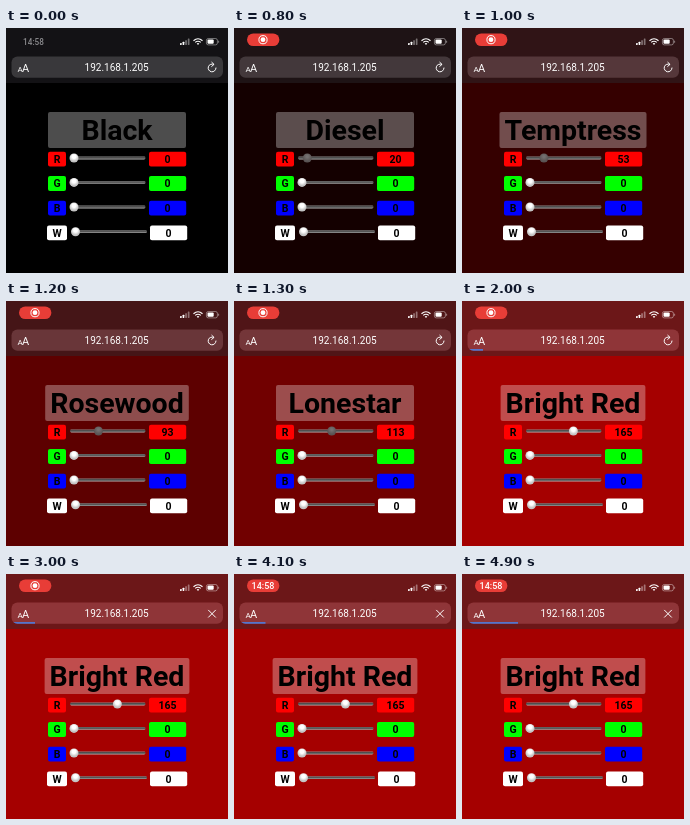
An HTML page for the animation above (5000 ms loop, 222 px wide and 245 px high).

```html
<!DOCTYPE html>
<html lang="en">
<head>
<meta charset="utf-8">
<title>RGBW slider</title>
<style>
html, body { margin: 0; width: 100%; height: 100%; overflow: hidden; background: #000; }
svg { display: block; width: 100vw; height: 100vh; font-family: Roboto, sans-serif; }
text { text-anchor: middle; }
.name { font-size: 28.5px; font-weight: 700; }
.tag { font-size: 10.5px; font-weight: 700; }
.bar { font-size: 10px; fill: #fff; }
.clock { font-weight: 500; }
</style>
</head>
<body>
<svg viewBox="0 0 222 245">
  <defs>
    <linearGradient id="groove" x2="0" y2="1">
      <stop offset="0" stop-color="#8c8c8c"/>
      <stop offset=".3" stop-color="#4c4c4c"/>
      <stop offset=".65" stop-color="#606060"/>
      <stop offset="1" stop-color="#b8b8b8"/>
    </linearGradient>
    <radialGradient id="knob" cy=".35">
      <stop offset=".4" stop-color="#fff"/>
      <stop offset="1" stop-color="#c4c4c4"/>
    </radialGradient>
    <radialGradient id="held" cy=".35">
      <stop offset=".2" stop-color="#747070"/>
      <stop offset="1" stop-color="#5a5454"/>
    </radialGradient>
    <clipPath id="clip"><rect x="5.5" y="28.5" width="211.5" height="21.3" rx="6"/></clipPath>
  </defs>

  <rect id="page" width="222" height="245"/>
  <rect id="head" width="222" height="55"/>
  <rect id="field" x="5.5" y="28.5" width="211.5" height="21.3" rx="6"/>
  <rect id="load" x="5.5" y="48.2" height="1.6" fill="#4486f4" clip-path="url(#clip)"/>
  <text class="bar" x="14" y="43.5" style="font-size:8px">A</text>
  <text class="bar" x="19.6" y="43.5" style="font-size:11px">A</text>
  <text class="bar" x="110.6" y="43">192.168.1.205</text>

  <g fill="none" stroke="#fff" stroke-linecap="round">
    <path id="reload" d="M207.8 36.4A3.9 3.9 0 1 0 210 40M205.8 34.3L208 36.4L205.7 38.4"/>
    <path id="stop" d="M202.5 36.2l7 7M209.5 36.2l-7 7"/>
  </g>

  <g fill="#fff">
    <rect x="174" y="15" width="1.7" height="2" rx=".4"/>
    <rect x="176.6" y="13.8" width="1.7" height="3.2" rx=".4"/>
    <rect x="179.2" y="12.2" width="1.7" height="4.8" rx=".4" fill-opacity=".4"/>
    <rect x="181.8" y="10.6" width="1.7" height="6.4" rx=".4" fill-opacity=".4"/>
    <path d="M190.7 15.5Q192 14.4 193.3 15.5L192 17Z"/>
    <path d="M187.5 12.7Q192 8.8 196.5 12.7M189.2 14.4Q192 12.1 194.8 14.4" fill="none" stroke="#fff" stroke-width="1.2"/>
    <rect x="200.4" y="10.5" width="11" height="6.4" rx="1.9" fill="none" stroke="#fff" stroke-opacity=".5" stroke-width=".8"/>
    <rect x="201.5" y="11.6" width="6.2" height="4.2" rx="1"/>
    <rect x="212.2" y="12.6" width=".9" height="2.2" rx=".4" fill-opacity=".5"/>
  </g>

  <rect id="pill" x="13" y="5.4" width="32.4" height="12.6" rx="6.3" fill="#e83d37"/>
  <g id="rec">
    <circle cx="29" cy="11.7" r="4.1" fill="none" stroke="#fff"/>
    <circle cx="29" cy="11.7" r="2.4" fill="#fff"/>
  </g>
  <text id="clock" class="clock">14:58</text>

  <rect id="plate" y="84" height="36" rx="2" fill="#fff" fill-opacity=".3"/>
  <text id="name" class="name" x="111" y="111.6"></text>
  <g id="rows"></g>
</svg>
<script>
const LOOP = 5000, STEP = 100;
const $ = id => document.getElementById(id);

// [time, red]
const RED = [[600, 0], [700, 6], [800, 20], [1000, 53], [1300, 113], [1500, 144], [1700, 162], [1800, 165]];
// [time, width of the loading line]
const LOAD = [[1800, 0], [1900, 9], [2000, 15.5], [3000, 23.5], [4100, 26], [4900, 50.5]];
// [lowest red, colour name]
const NAMES = [[0, "Black"], [10, "Diesel"], [32, "Sepia Black"], [49, "Temptress"], [63, "Burnt Maroon"],
  [70, "Mahogany"], [90, "Rosewood"], [105, "Lonestar"], [119, "Maroon"], [136, "Red Berry"], [160, "Bright Red"]];
// label, fill, centre y, x shift
const ROWS = [["R", "#f00", 131, 0], ["G", "#0f0", 155.4, 0], ["B", "#00f", 180, 0], ["W", "#fff", 204.7, 1]];

$("rows").innerHTML = ROWS.map(([label, fill, y, dx]) => `
  <rect x="${42 - dx}" y="${y - 7.3}" width="${18 + dx * 2}" height="14.8" rx="2" fill="${fill}"/>
  <text class="tag" x="51" y="${y + 3.8}">${label}</text>
  <rect x="${64 + dx * 1.5}" y="${y - 2.5}" width="75.5" height="2.9" rx="1.4" fill="url(#groove)"/>
  <circle id="knob${label}" cx="${68 + dx * 1.5}" cy="${y - 1}" r="4.5" fill="url(#knob)"/>
  <rect x="${143 + dx}" y="${y - 7.3}" width="37.2" height="14.8" rx="2" fill="${fill}"/>
  <text id="val${label}" class="tag" x="${161.5 + dx}" y="${y + 3.8}">0</text>`).join("");

function track(keys, t) {
  if (t <= keys[0][0]) return keys[0][1];
  for (let i = 1; i < keys.length; i++) {
    const [a, from] = keys[i - 1], [b, to] = keys[i];
    if (t <= b) return from + (to - from) * (t - a) / (b - a);
  }
  return keys[keys.length - 1][1];
}

const set = (id, attrs) => {
  for (const k in attrs) $(id).setAttribute(k, attrs[k]);
};
const show = (id, on) => set(id, { visibility: on ? "visible" : "hidden" });

function draw(t) {
  const red = Math.round(track(RED, t));
  const name = NAMES.filter(n => n[0] <= red).pop()[1];
  set("page", { fill: `rgb(${red},0,0)` });
  set("head", { fill: `rgb(${19 + red * .54},${18 + red * .03},${21 + red * .02})` });
  set("field", { fill: `rgb(${57 + red * .52},${56 - red * .02},${59 - red * .02})` });

  $("name").textContent = name;
  const w = Math.max(138, $("name").getComputedTextLength() + 10);
  set("plate", { x: 111 - w / 2, width: w });

  $("valR").textContent = red;
  const held = t >= 600 && t < 1900;
  set("knobR", { cx: 68 + red * .263, fill: held ? "url(#held)" : "url(#knob)" });

  set("load", { width: track(LOAD, t) });
  show("reload", t < 2100);
  show("stop", t >= 2100);

  const pill = t >= 300, rec = pill && t < 3500;
  show("pill", pill);
  show("rec", rec);
  show("clock", !rec);
  set("clock", pill
    ? { x: 29, y: 14.8, fill: "#fff", "font-size": 9 }
    : { x: 27.5, y: 16.8, fill: "#8a8a8d", "font-size": 8.2 });
}

const start = performance.now();
function tick() {
  const t = (performance.now() - start) % LOOP;
  draw(Math.floor(t / STEP) * STEP);
  requestAnimationFrame(tick);
}
tick();
</script>
</body>
</html>
```
